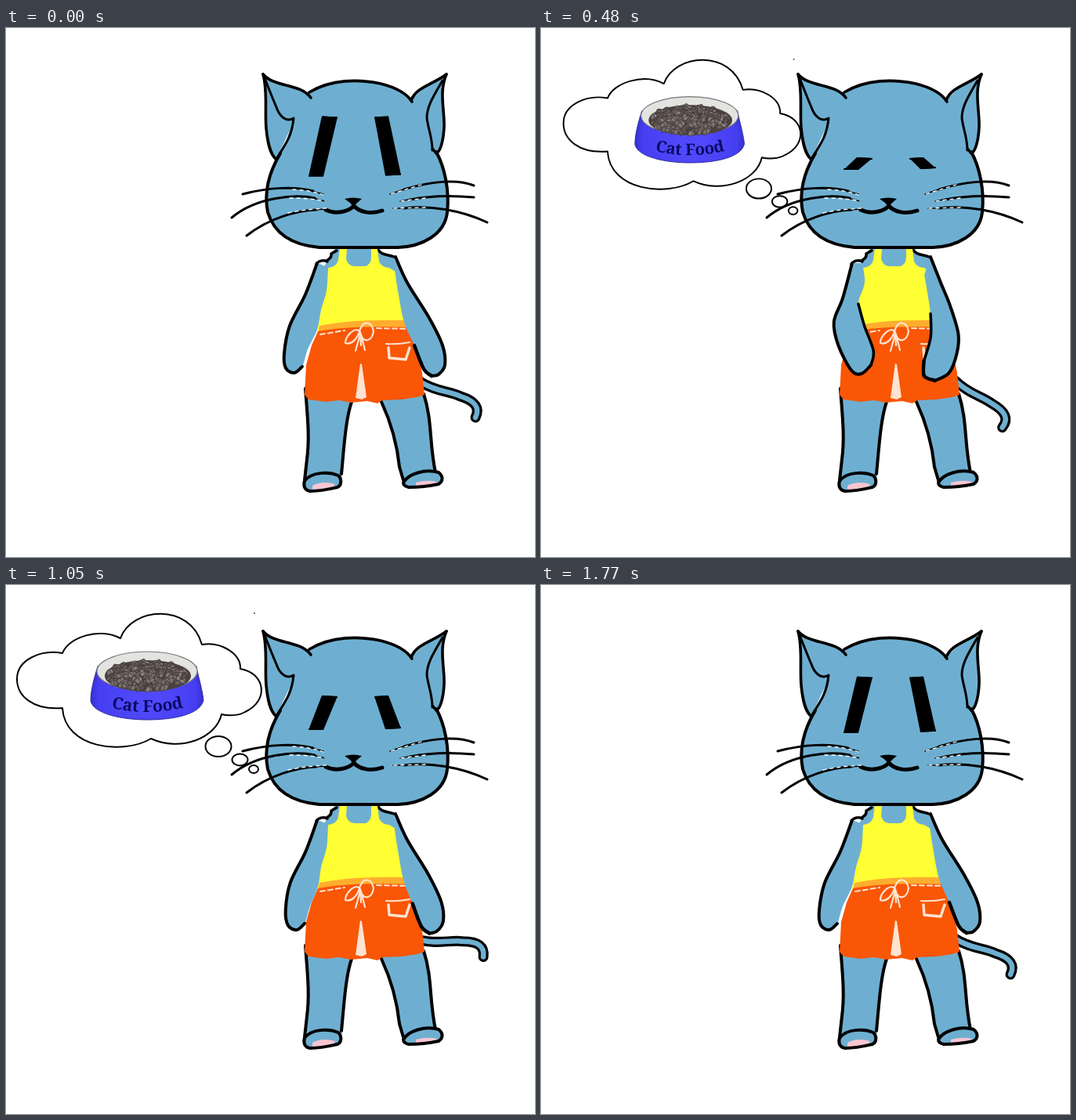
These frames come from a looping animation (675x675 px, 1.8 s). An HTML page with a canvas:

```html
<!DOCTYPE html>
<html lang="en">
<head>
<meta charset="utf-8">
<title>Hungry cat</title>
<style>
html, body { margin: 0; width: 100%; height: 100%; overflow: hidden; background: #fff; }
canvas { display: block; width: 675px; height: 675px; }
</style>
</head>
<body>
<canvas id="stage" width="675" height="675"></canvas>
<script>
const ctx = document.getElementById('stage').getContext('2d');
const LOOP = 1800, STEP = 30;
const BLUE = '#6eafd1', INK = '#000', CREAM = '#ffe3d0';

const lerp = (a, b, k) => a + (b - a) * k;

// Keys are [time, value]; smooth tracks use tangents from the neighbours.
function track(keys, t, smooth) {
  let i = 0;
  while (i < keys.length - 2 && t >= keys[i + 1][0]) i++;
  const [t0, a] = keys[i], [t1, b] = keys[i + 1];
  const k = Math.min(1, (t - t0) / (t1 - t0));
  if (!smooth) return lerp(a, b, k);
  const slope = j => {
    const p = keys[Math.max(0, j - 1)], n = keys[Math.min(keys.length - 1, j + 1)];
    return (n[1] - p[1]) / (n[0] - p[0]) * (t1 - t0);
  };
  const k2 = k * k, k3 = k2 * k;
  return a * (2 * k3 - 3 * k2 + 1) + slope(i) * (k3 - 2 * k2 + k) +
    b * (3 * k2 - 2 * k3) + slope(i + 1) * (k3 - k2);
}

function fill(d, color) {
  ctx.fillStyle = color;
  ctx.fill(new Path2D(d));
}

function line(d, width = 4, color = INK, dash = []) {
  ctx.strokeStyle = color;
  ctx.lineWidth = width;
  ctx.setLineDash(dash);
  ctx.stroke(new Path2D(d));
  ctx.setLineDash([]);
}

// Smooth open curve through a run of points
function through(pts) {
  let d = `M${pts[0]}`;
  for (let i = 0; i < pts.length - 1; i++) {
    const p0 = pts[Math.max(0, i - 1)], p1 = pts[i], p2 = pts[i + 1];
    const p3 = pts[Math.min(pts.length - 1, i + 2)];
    d += `C${p1[0] + (p2[0] - p0[0]) / 6} ${p1[1] + (p2[1] - p0[1]) / 6} ` +
      `${p2[0] - (p3[0] - p1[0]) / 6} ${p2[1] - (p3[1] - p1[1]) / 6} ${p2}`;
  }
  return d;
}

function oval(x, y, rx, ry, color, edge, width = 2) {
  ctx.beginPath();
  ctx.ellipse(x, y, rx, ry, 0, 0, 7);
  if (color) { ctx.fillStyle = color; ctx.fill(); }
  if (edge) { ctx.strokeStyle = edge; ctx.lineWidth = width; ctx.stroke(); }
}

// ---- thought cloud ----
let seed = 11;
const rnd = () => (seed = (seed * 16807) % 2147483647) / 2147483647;
const kibble = Array.from({ length: 230 }, () => {
  const a = rnd() * 6.283, r = Math.sqrt(rnd());
  return { x: 181 + Math.cos(a) * r * 52, y: 115.5 + Math.sin(a) * r * 18,
    turn: rnd() * 3, tone: Math.floor(rnd() * 55) };
}).sort((a, b) => a.y - b.y);

const CLOUD = 'M72 87C80 66 120 54 146 68C160 28 235 22 250 76C275 72 300 88 299 107' +
  'C330 112 337 147 305 162C297 167 283 167 275 165C268 196 222 213 185 196' +
  'C150 217 75 209 72 157C35 160 14 142 14 120C14 95 45 82 72 87Z';

function bowl() {
  const shade = ctx.createRadialGradient(180, 145, 15, 180, 140, 78);
  shade.addColorStop(0, '#4f49fb');
  shade.addColorStop(0.75, '#463ff2');
  shade.addColorStop(1, '#2d27bd');
  const body = 'M117 104C112 120 108 135 108 148C112 165 150 172 180 172' +
    'C215 172 248 165 252 147C250 130 244 112 243 104Z';
  fill(body, shade);
  line(body, 1, '#34319a');
  oval(180, 110, 64, 25, '#e3e3e0', '#77777c', 1.2);
  oval(181, 116, 55, 20, '#4b423f');
  for (const k of kibble) {
    ctx.beginPath();
    ctx.ellipse(k.x, k.y, 3.8, 2.7, k.turn, 0, 7);
    ctx.fillStyle = `rgb(${92 + k.tone},${82 + k.tone},${79 + k.tone})`;
    ctx.fill();
    ctx.strokeStyle = '#3d3533';
    ctx.lineWidth = 0.8;
    ctx.stroke();
  }
  label('Cat Food', 180, 162, 193);
}

function label(text, x, y, radius) {
  ctx.font = '600 21px "Noto Serif", "Liberation Serif", serif';
  ctx.fillStyle = '#0c0a63';
  ctx.textAlign = 'center';
  let at = -ctx.measureText(text).width / 2;
  for (const ch of text) {
    const w = ctx.measureText(ch).width, a = (at + w / 2) / radius;
    ctx.save();
    ctx.translate(x + Math.sin(a) * radius, y - radius * (1 - Math.cos(a)));
    ctx.rotate(-a);
    ctx.fillText(ch, 0, 0);
    ctx.restore();
    at += w;
  }
}

function cloud(t) {
  if (t < 30 || t >= 1620) return;
  let s = track([[0, 0.2], [240, 0.713], [480, 0.97], [510, 1]], t);
  let x = track([[0, 400], [240, 283], [480, 179.5], [510, 169.5]], t);
  let y = track([[0, 165], [240, 139], [480, 123], [510, 121.5]], t);
  if (t > 1080) {
    s = 1 - ((t - 1080) / 540) ** 2;
    x = lerp(296, 169.5, s);
    y = lerp(173, 121.5, s);
  }
  ctx.save();
  ctx.translate(x, y);
  ctx.scale(s, s);
  ctx.translate(-169.5, -121.5);
  fill(CLOUD, '#fff');
  line(CLOUD, 2);
  oval(271, 206, 16.5, 13, '#fff', INK);
  oval(298.5, 223, 10, 7.5, '#fff', INK);
  oval(316, 235, 6, 5, '#fff', INK);
  oval(317, 36, 1, 0.8, INK);
  bowl();
  ctx.restore();
}

// ---- cat ----
function tail(t) {
  const turn = track([[0, 0], [240, 30], [480, 12], [720, -20], [880, -29], [1050, -18],
    [1290, 15], [1410, 20], [1640, -8], [1770, 0], [1800, 0]], t, true);
  ctx.save();
  ctx.translate(533, 454);
  ctx.rotate(turn * Math.PI / 180);
  ctx.translate(-533, -454);
  const d = 'M528 451C548 464 565 463 580 470C599 476 605 485 599 497';
  line(d, 13);
  line(d, 6.5, BLUE);
  ctx.restore();
}

function legs() {
  fill('M382 465Q387 520 383 560L381 580L428 578Q430 530 441 470Z', BLUE);
  fill('M476 470Q497 520 502 562L508 580L548 570Q543 505 532 465Z', BLUE);
  line('M382 460C384 490 388 520 384 550L381 577');
  line('M441 477C433 500 431 540 428 569');
  line('M479 477C492 505 499 530 502 560L507 577');
  line('M533 467C544 500 540 530 548 567');
  const left = 'M381 578C390 566 412 566 424 571C429 576 428 584 423 586C410 589 402 591 388 591C381 590 379 584 381 578Z';
  const right = 'M507 580C513 569 535 562 552 567C559 573 557 579 552 582C538 585 527 586 514 586C509 585 507 583 507 580Z';
  fill(left, BLUE);
  fill('M391 584Q404 577 420 582L417 587Q404 590 391 590Z', '#f7c6d2');
  line(left);
  fill(right, BLUE);
  fill('M523 580Q538 576 550 579L549 583Q536 586 523 585Z', '#f7c6d2');
  line(right);
}

function torso() {
  fill('M420 281L477 281L481 290L495 290L500 312L404 312L409 297L414 290Z', BLUE);
  line('M396 301C400 296 406 296 410 298M409 297Q416 293 415 288L422 284', 3.5);
  line('M474 282C478 290 488 289 495 292', 3.5);
  fill('M426 281L435 281L434 295Q437 304 445 304L458 304Q466 302 466 292L466 281L474 281' +
    'L476 298Q479 305 489 306L497 311L500 330L508 355L515 385L397 388L402 360L408 335' +
    'L411 306Q422 305 424 296Z', '#ffff33');
  fill('M400 380Q440 371 513 373L515 385L398 389Z', '#ffad2e');
}

function shorts() {
  fill('M398 387Q440 379 518 382L522 397L531 440L534 468L525 471L505 474L480 475L474 479' +
    'L461 476L440 478L425 475L408 477L386 474L381 468L383 430L390 405Z', '#f95606');
  line('M401 391L432 386', 2, CREAM, [6, 4]);
  line('M473 383L515 384', 2, CREAM, [6, 4]);
  line('M452 388C445 379 433 394 433 402C441 405 449 396 452 384' +
    'C457 372 467 375 469 387C467 401 455 403 452 388M452 390L446 412M453 391L458 411M452 390L453 405', 2.2, CREAM);
  line('M485 403Q500 404 515 401', 2.2, CREAM);
  line('M488 408L489 421L510 423L515 408', 3.4, CREAM);
  fill('M452 428L454 429L460 471L454 474L446 472Z', CREAM);
}

const ARMS = [{
  out: [[397, 300], [382, 340], [362, 380], [355, 415], [357, 434], [368, 440],
    [378, 432], [385, 410], [397, 385], [402, 360], [409, 335], [411, 305]],
  bent: [[397, 300], [385, 345], [374, 375], [380, 405], [397, 437], [410, 441],
    [422, 430], [425, 412], [413, 380], [405, 352], [413, 325], [410, 300]]
}, {
  out: [[497, 292], [512, 325], [540, 370], [557, 405], [560, 430], [552, 442],
    [543, 444], [533, 435], [521, 405], [508, 375], [500, 335], [496, 308]],
  bent: [[497, 292], [510, 325], [522, 355], [532, 390], [530, 415], [520, 440],
    [502, 450], [488, 444], [488, 425], [497, 395], [497, 365], [489, 315]]
}];

function arms(t) {
  const bend = track([[0, 0], [240, 0.45], [480, 0.98], [540, 1.07], [630, 1.07],
    [720, 0.93], [1050, 0.07], [1080, 0], [1800, 0]], t);
  ARMS.forEach(({ out, bent }, side) => {
    const pts = out.map((p, i) => [lerp(p[0], bent[i][0], bend), lerp(p[1], bent[i][1], bend)]);
    fill(through(pts) + 'Z', BLUE);
    line(through(pts.slice(0, 7)));
    if (side) line(through(pts.slice(6, 9)), 4.5);
    ctx.globalAlpha = Math.max(0, Math.min(1, bend * 3 - 0.3));
    line(through(pts.slice(side ? 8 : 6, side ? 11 : 10)), 3.5);
    ctx.globalAlpha = 1;
  });
}

function head() {
  fill('M327 58L340 70L365 76L390 84L367 120L345 167L335 150Q330 110 332 80Z', BLUE);
  fill('M562 59L540 70L517 92L545 158L549 160L557 148Q562 115 556 90Z', BLUE);
  fill('M390 82C415 66 450 64 478 71C498 76 510 83 518 92C540 110 540 140 549 158' +
    'C560 178 567 208 563 235C560 264 530 279 500 280L400 280C365 277 342 262 334 235' +
    'C328 205 338 180 350 160C368 130 360 105 390 82Z', BLUE);
  line('M387 82C415 65 450 65 478 71C498 76 511 83 518 94', 3.6);
  line('M549 158C560 178 566 208 563 235C560 264 530 279 500 280L400 280' +
    'C365 277 342 262 334 235C328 205 338 180 350 160', 4);
  line('M328 59C334 80 330 105 332 128C334 148 337 160 344 167', 3.6);
  line('M328 59C342 76 375 70 389 89', 3.6);
  line('M330 64C338 84 341 92 345 101C349 113 358 121 367 115C365 136 359 145 345 167', 3);
  line('M562 59C552 82 560 105 559 127C558 145 554 158 549 160L545 155', 3.6);
  line('M562 59C545 72 524 75 517 92', 3.6);
  line('M557 67C545 88 537 100 537 115C539 130 544 140 544 156', 3);
}

function face(t) {
  const h = track([[0, 77], [240, 44], [480, 16], [540, 12], [720, 24], [1050, 44],
    [1290, 60], [1770, 72], [1800, 77]], t);
  const low = 181 + (h - 16) * 0.14, top = low - h;
  fill(`M403 ${top}L423 ${top + 1}L405 ${low}L386 ${low}Z`, INK);
  fill(`M470 ${top + 1}L488 ${top}L504 ${low - 2}L484 ${low - 1}Z`, INK);
  line(`M404 ${top + 1}L422 ${top + 2}M387 ${low - 1}L404 ${low - 1}` +
    `M471 ${top + 2}L487 ${top + 1}M485 ${low - 2}L503 ${low - 3}`, 2);

  fill('M432 218Q443 215 454 218L447 224L444 229L439 223Z', INK);
  line('M408 232C420 238 436 235 444 227C451 235 465 238 480 233', 5);

  line('M302 212C335 203 370 202 392 208M288 242C320 215 370 212 394 217' +
    'M307 265C335 243 370 233 396 232', 3);
  line('M597 201C575 192 540 196 508 206M597 216C565 213 535 215 516 219' +
    'M614 248C580 232 540 226 508 230', 3);
  line('M390 208L405 212M392 217L407 221M394 232L409 231' +
    'M510 205L490 212M518 218L503 221M510 230L494 230', 1.4);
  line('M366 206Q390 207 405 213M362 217Q390 217 407 221M360 236Q385 231 409 230' +
    'M530 200L490 212M535 217L503 221M535 229L494 230', 1.3, '#fff', [4, 5]);
}

function draw(now) {
  const t = Math.floor((now % LOOP) / STEP) * STEP;
  ctx.fillStyle = '#fff';
  ctx.fillRect(0, 0, 675, 675);
  cloud(t);
  tail(t);
  legs();
  torso();
  shorts();
  arms(t);
  head();
  face(t);
}

ctx.lineCap = ctx.lineJoin = 'round';
let start;
function tick(now) {
  start ??= now;
  draw(now - start);
  requestAnimationFrame(tick);
}
draw(0);
requestAnimationFrame(tick);
</script>
</body>
</html>
```
